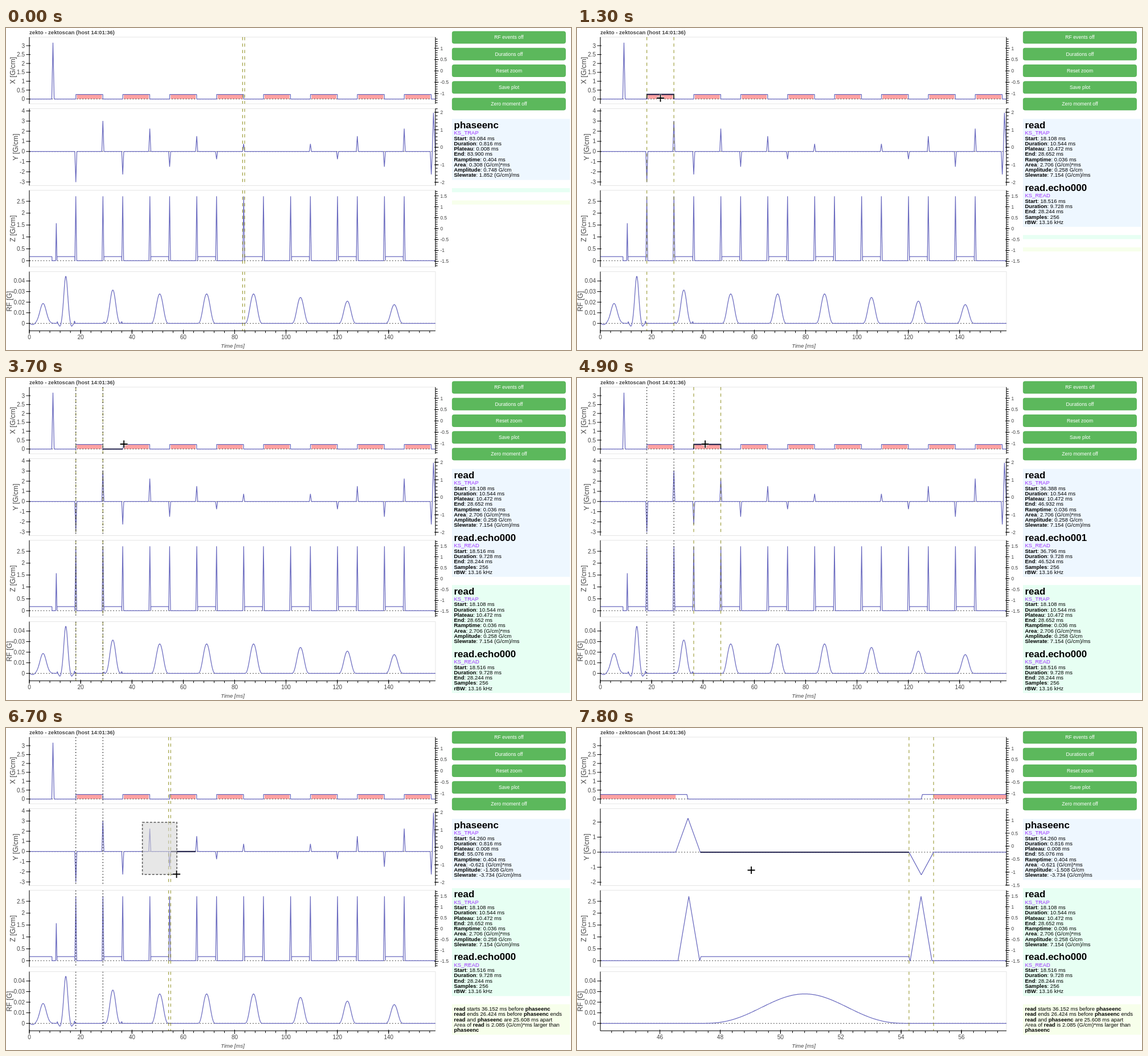
Recreate the animation shown at these times as an HTML page. Size 992 px wide and 565 px high, loop 8 s.

```html
<!DOCTYPE html>
<html lang="en">
<head>
<meta charset="utf-8">
<title>Sequence plot</title>
<style>
html, body { margin: 0; width: 100%; height: 100%; overflow: hidden; background: #fff; }
svg { display: block; width: 992px; height: 565px; font-family: "Liberation Sans", Arial, sans-serif; }
</style>
</head>
<body>
<svg id="stage" viewBox="0 0 992 565"></svg>
<script>
const stage = document.getElementById("stage");
const LOOP = 8000, LEFT = 41, RIGHT = 754;
const FULL = { start: 0, scale: 4.506, step: 20 };
const ZOOM = { start: 44.026, scale: 52.95, step: 2 };
const WAVE = "#6a6abf";

// ---- sequence model -------------------------------------------------
const readStart = k => 18.108 + 18.28 * k;
const readEnd = k => readStart(k) + 10.544;
const echoes = [...Array(8).keys()];
const triangle = (mid, half, amp) => [[mid - half, 0], [mid, amp], [mid + half, 0]];
const readTrap = k => [[readStart(k), 0], [readStart(k) + .036, .258], [readEnd(k) - .036, .258], [readEnd(k), 0]];

function waveX() {
  return [[0, 0], ...triangle(9.2, .47, 3.17), ...echoes.flatMap(readTrap), [159, 0]];
}

function waveY() {
  const pulses = echoes.flatMap(k => {
    const amp = -3.016 + .754 * k;
    return [...triangle(readStart(k), .408, amp), ...triangle(readEnd(k), .408, -amp)];
  });
  return [[0, 0], ...pulses, [157.45, 3.82], [158.2, 0], [159, 0]];
}

function waveZ() {
  const slice = .172;
  const pts = [[0, slice], [8.8, slice], [8.83, 0], ...triangle(10.5, .27, 1.58), [10.8, slice]];
  for (const k of echoes) {
    const s = readStart(k), e = readEnd(k);
    pts.push([s - .41, slice], [s - .38, 0], ...triangle(s - .008, .36, 2.71));
    if (k < 7) pts.push(...triangle(e + .028, .36, 2.71), [e + .43, slice]);
  }
  return [...pts, [159, 0]];
}

const bell = (t, mid, width) => Math.exp(-(((t - mid) / width) ** 2));
const refocus = [.0315, .0278, .0278, .0278, .0245, .021, .0177];

function rf(t) {
  let v = .0188 * bell(t, 5.35, 1.75) - .0012 * bell(t, 1.4, .9);
  v += .0445 * bell(t, 14.2, 1.08) - .0032 * (bell(t, 12, .6) + bell(t, 16.4, .6));
  for (const [mid, amp] of [[10.9, .0018], [17.6, .0024], [29.1, .0014], [36, .0018]]) v += amp * bell(t, mid, .16);
  refocus.forEach((amp, k) => {
    const u = (t - (readEnd(k) + readStart(k + 1)) / 2) / 3.46;
    // the first refocusing pulse is taller and narrower
    if (Math.abs(u) < 1) v += amp * Math.cos(u * Math.PI / 2) ** (k ? 2.7 : 3.8);
  });
  return v;
}

const waves = [waveX(), waveY(), waveZ()];

// zero: y of value 0, unit: pixels per unit, step: tick distance
const axis = (zero, unit, step) => ({ zero, unit, step });
const panels = [
  { name: "X [G/cm]", labelX: 12, top: 16, bottom: 133, left: axis(124.6, 31.2, .5), right: axis(75.3, 39.8, .5) },
  { name: "Y [G/cm]", labelX: 17, top: 141.5, bottom: 276.5, left: axis(216.7, 17.8, 1), right: axis(209.3, 30.7, 1),
    zoomLeft: axis(217.9, 26.4, 1), zoomRight: axis(207.3, 45.6, .5) },
  { name: "Z [G/cm]", labelX: 12, top: 284.8, bottom: 419.2, left: axis(408.3, 41.7, .5), right: axis(352, 38.3, .5) },
  { name: "RF [G]", labelX: 6, top: 427.5, bottom: 531.3, left: axis(518.3, 1860, .01) }
];

// ---- drawing helpers ------------------------------------------------
const f = n => +n.toFixed(2);
const line = (x1, y1, x2, y2, style = 'stroke="#000"') =>
  `<line x1="${f(x1)}" y1="${f(y1)}" x2="${f(x2)}" y2="${f(y2)}" ${style}/>`;
const rect = (x, y, w, h, style) => `<rect x="${f(x)}" y="${f(y)}" width="${f(w)}" height="${f(h)}" ${style}/>`;
const text = (x, y, size, body, style = "") =>
  `<text x="${f(x)}" y="${f(y + size * .355)}" font-size="${size}" ${style}>${body}</text>`;
const bold = s => `<tspan font-weight="700">${s}</tspan>`;
const poly = (pts, style) => `<polyline points="${pts.map(p => p.map(f).join()).join(" ")}" fill="none" ${style}/>`;
const grey = 'fill="#444"';

function ticks(from, to, step, draw) {
  for (let i = Math.ceil(from / step - 1e-6); i * step <= to; i++) draw(f(i * step));
}

function verticalAxis(p, a, side) {
  const x = side < 0 ? LEFT : RIGHT;
  const low = (a.zero - p.bottom) / a.unit, high = (a.zero - p.top) / a.unit;
  const y = v => a.zero - v * a.unit;
  let out = line(x, p.top, x, p.bottom);
  if (side > 0) ticks(low, high, a.step / 5, v => out += line(x, y(v), x + 3.8, y(v)));
  ticks(low, high, a.step, v => {
    out += line(x - side * 1.9, y(v), x + side * 5.6, y(v));
    out += side < 0 ? text(33, y(v), 10, v, grey + ' text-anchor="end"') : text(762.5, y(v), 8.5, v, grey);
  });
  return out;
}

function timeAxis(view) {
  const y = 531.3, x = t => LEFT + (t - view.start) * view.scale;
  const end = view.start + (RIGHT - LEFT) / view.scale;
  let out = line(LEFT, y, RIGHT, y);
  ticks(view.start, end, view.step / 5, t => out += line(x(t), y, x(t), y + 3.8));
  ticks(view.start, end, view.step, t => {
    out += line(x(t), y - 1.9, x(t), y + 5.6) + text(x(t), 542.5, 10, t, grey + ' text-anchor="middle"');
  });
  return out + text(398, 557.7, 9.5, "Time [ms]", grey + ' text-anchor="middle" font-style="italic"');
}

function plot(p, i, view, state) {
  const zoomed = view === ZOOM;
  const a = zoomed && p.zoomLeft || p.left, r = zoomed && p.zoomRight || p.right;
  const x = t => LEFT + (t - view.start) * view.scale;
  const y = v => a.zero - v * a.unit;
  const map = pts => pts.map(([t, v]) => [x(t), y(v)]);
  const marks = (o, style) => [o.start, o.end].map(t => line(x(t), p.top, x(t), p.bottom, style)).join("");
  const height = p.bottom - p.top;

  let out = rect(LEFT, p.top, RIGHT - LEFT, height, 'fill="#fff" stroke="#e5e5e5"');
  out += `<clipPath id="clip${i}">${rect(LEFT, p.top, RIGHT - LEFT, height, "")}</clipPath><g clip-path="url(#clip${i})">`;
  if (i === 0) for (const k of echoes) {
    out += rect(x(readStart(k) + .408), y(.258), 9.728 * view.scale, .258 * a.unit, 'fill="#ffa2a2"');
  }
  out += line(LEFT, a.zero, RIGHT, a.zero, 'stroke="#444" stroke-dasharray="1.9 3"');
  const curve = waves[i] ? map(waves[i])
    : Array.from({ length: 1427 }, (_, n) => [LEFT + n / 2, y(rf(view.start + n / 2 / view.scale))]);
  out += poly(curve, `stroke="${WAVE}" stroke-width="1.25" stroke-linejoin="bevel"`);
  if (state.bold && state.bold.panel === i) out += poly(map(state.bold.pts), 'stroke="#15153f" stroke-width="1.9"');
  out += marks(state.hover, 'stroke="#808000" stroke-opacity=".75" stroke-width="1.2" stroke-dasharray="5.6"');
  if (state.picked) out += marks(state.picked, 'stroke="#222" stroke-width="1.1" stroke-dasharray="1.9 3.3"');
  out += "</g>" + verticalAxis(p, a, -1);
  if (r) out += verticalAxis(p, r, 1);
  const mid = i === 3 ? 479.5 : (p.top + p.bottom) / 2;
  return out + `<g transform="translate(${p.labelX} ${mid}) rotate(-90)">` +
    text(0, 0, 12.2, p.name, grey + ' text-anchor="middle"') + "</g>";
}

// ---- side column ----------------------------------------------------
const ROW = 9.26, GAP = 14.4, EMPTY = 7.2;

function trap(name, start, dur, plateau, ramp, area, amp, slew) {
  return [name, "KS_TRAP", ["Start", start.toFixed(3) + " ms"], ["Duration", dur + " ms"], ["Plateau", plateau + " ms"],
    ["End", (start + +dur).toFixed(3) + " ms"], ["Ramptime", ramp + " ms"], ["Area", area + " (G/cm)*ms"],
    ["Amplitude", amp + " G/cm"], ["Slewrate", slew + " (G/cm)/ms"]];
}

function read(k) {
  const s = readStart(k);
  return { start: s, end: readEnd(k), blocks: [
    trap("read", s, "10.544", "10.472", "0.036", "2.706", "0.258", "7.154"),
    ["read.echo00" + k, "KS_READ", ["Start", (s + .408).toFixed(3) + " ms"], ["Duration", "9.728 ms"],
      ["End", (s + 10.136).toFixed(3) + " ms"], ["Samples", "256"], ["rBW", "13.16 kHz"]]
  ] };
}

const phase = (start, ...values) => ({ start, end: start + .816,
  blocks: [trap("phaseenc", start, "0.816", "0.008", "0.404", ...values)] });

function infoBox(top, object, fill) {
  let y = top, body = "";
  for (const [title, kind, ...rows] of object ? object.blocks : []) {
    body += text(786.5, y + 10.2, 17, title, 'font-weight="700"');
    body += text(786.5, y + 24.2, 9.5, kind, 'fill="#9b30ff"');
    rows.forEach(([key, value], n) => body += text(786.5, y + 33.8 + n * ROW, 9.5, bold(key) + ": " + value));
    y += 36 + rows.length * ROW;
  }
  const height = object ? y - top - 3 : EMPTY;
  return { bottom: top + height, svg: rect(783, top, 207, height, `fill="${fill}"`) + body };
}

function sideColumn(state) {
  let out = "";
  ["RF events off", "Durations off", "Reset zoom", "Save plot", "Zero moment off"].forEach((label, n) => {
    const y = 6 + n * 29.25;
    out += rect(783.4, y, 199, 21, 'rx="3" fill="#5cb85c" stroke="#4cae4c" stroke-width=".8"');
    out += text(883, y + 10.2, 8.67, label, 'fill="#fff" text-anchor="middle"');
  });
  const top = infoBox(159.5, state.hover, "#eef7ff");
  const mid = infoBox(top.bottom + GAP, state.picked, "#e7fff3");
  const y = mid.bottom + GAP;
  const a = bold("read"), b = bold("phaseenc");
  const notes = state.compare ? [`${a} starts 36.152 ms before ${b}`, `${a} ends 26.424 ms before ${b} ends`,
    `${a} and ${b} are 25.608 ms apart`, `Area of ${a} is 2.085 (G/cm)*ms larger than`, b] : [];
  out += top.svg + mid.svg + rect(783, y, 207, EMPTY + notes.length * ROW, 'fill="#f7ffeb"');
  notes.forEach((s, n) => out += text(786.5, y + 7.9 + n * ROW, 9.5, s));
  return out;
}

// ---- timeline: each entry changes part of the state --------------------
const boldRead = k => ({ panel: 0, pts: readTrap(k) });
const boldFlat = (panel, from, to) => ({ panel, pts: [[from, 0], [to, 0]] });
const timeline = [
  [0, { view: FULL, hover: phase(83.084, "0.308", "0.748", "1.852") }],
  [400, { cursor: [330, 205] }], [500, { cursor: [260, 196] }], [600, { cursor: [190, 180] }],
  [700, { cursor: [120, 160] }], [800, { cursor: [75, 140] }], [900, { cursor: [57, 124] }],
  [1000, { cursor: [92, 116] }],
  [1100, { cursor: [140, 117], hover: read(0), bold: boldRead(0) }],
  [1200, { cursor: [162, 118] }], [1300, { cursor: [146.5, 123] }],
  [1500, { cursor: [146.5, 121] }], [1600, { cursor: [147, 119] }], [1700, { cursor: [147, 117] }],
  [1800, { cursor: [147, 115] }], [1900, { cursor: [147, 114] }],
  [3700, { cursor: [207, 116], picked: read(0), bold: boldFlat(0, 28.652, 36.388) }],
  [3900, { cursor: [218, 116], hover: read(1), bold: boldRead(1) }],
  [4100, { cursor: [245, 117] }], [4200, { cursor: [225, 116] }],
  [5300, { cursor: [245, 117] }], [5500, { cursor: [225, 116] }],
  [5900, { cursor: [233, 138] }],
  [6000, { cursor: [239.5, 166], bold: boldFlat(1, 36.796, 46.524) }],
  [6300, { cursor: [274.5, 216.5], box: [245, 173.5] }],
  [6500, { cursor: [290, 242], box: [274, 216.5], hover: phase(54.26, "-0.621", "-1.508", "-3.734"),
    bold: boldFlat(1, 55.076, 64.804), compare: true }],
  [6700, { cursor: [299.5, 256.5], box: [300, 257] }],
  [7300, { view: ZOOM, box: null }],
  [7800, { cursor: [306, 249.5], bold: boldFlat(1, 47.34, 54.26) }]
];

function draw(state) {
  let out = text(41, 7.4, 9.6, "zekto - zektoscan (host 14:01:36)", grey + ' font-weight="700"');
  out += panels.map((p, i) => plot(p, i, state.view, state)).join("") + timeAxis(state.view) + sideColumn(state);
  if (state.box) {
    const [x, y] = state.box;
    out += rect(239.5, 165.5, x - 239.5, y - 165.5,
      'fill="#d3d3d3" fill-opacity=".55" stroke="#555" stroke-width="1.5" stroke-dasharray="4 2.6"');
  }
  if (state.cursor) {
    const [x, y] = state.cursor;
    const plus = `M${x - 6.5} ${y}h13M${x} ${y - 6.5}v13`;
    out += `<path d="${plus}" stroke="#fff" stroke-width="3.6"/><path d="${plus}" stroke="#000" stroke-width="1.8"/>`;
  }
  stage.innerHTML = out;
}

let shown = -1;
function tick() {
  const now = performance.now() % LOOP;
  const count = timeline.filter(([at]) => at <= now).length;
  if (count !== shown) {
    shown = count;
    draw(Object.assign({}, ...timeline.slice(0, count).map(entry => entry[1])));
  }
  requestAnimationFrame(tick);
}
tick();
</script>
</body>
</html>
```
